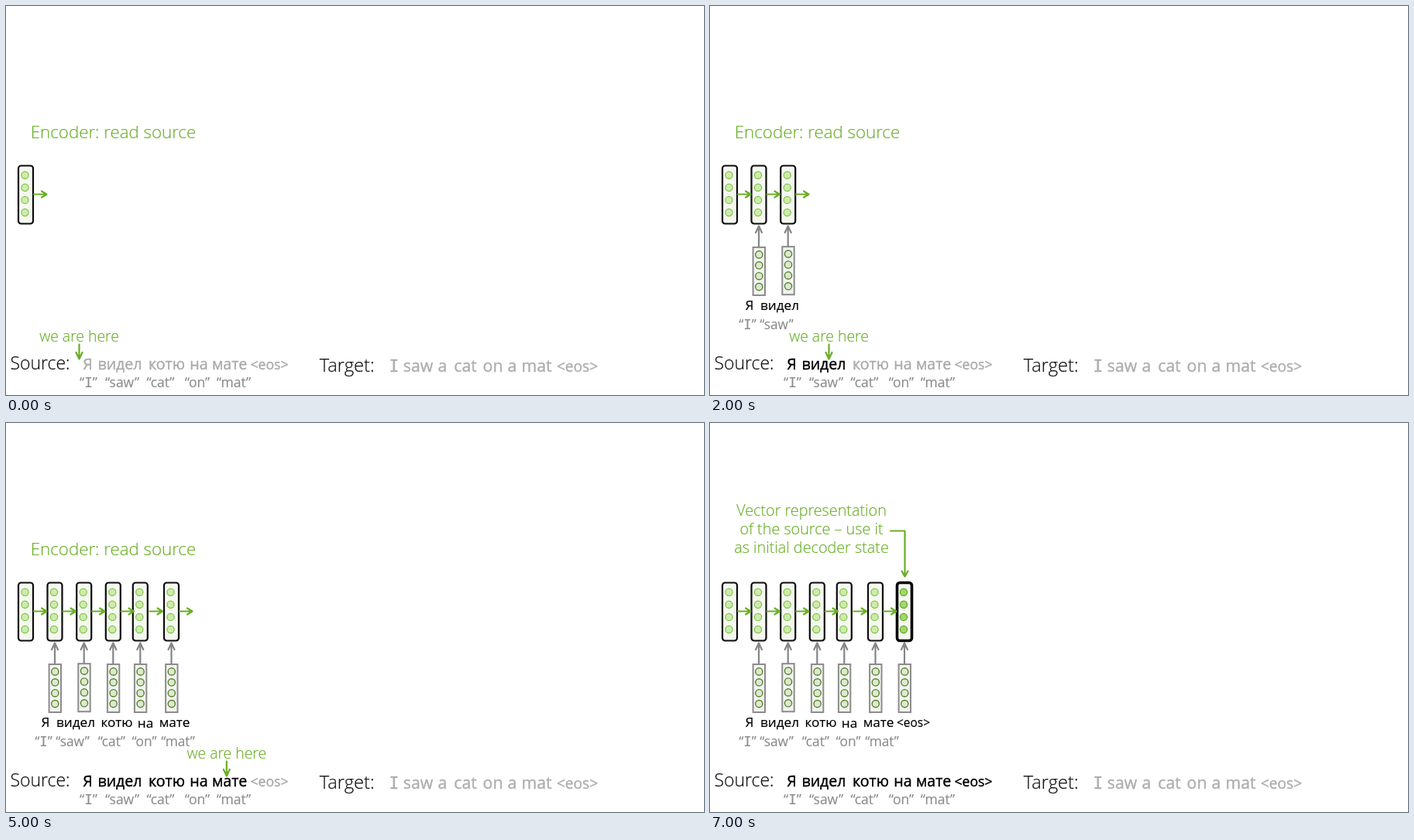
Write an HTML page that moves like this. It is 901 px wide and 503 px high and loops after 8 s.

```html
<!DOCTYPE html>
<html lang="en">
<head>
<meta charset="utf-8">
<title>Encoder reads the sentence</title>
<style>
  html, body { margin: 0; width: 100%; height: 100%; overflow: hidden; background: #fff; }
  svg { display: block; width: 901px; height: 503px; }
  text { font-family: "Open Sans", "Noto Sans", sans-serif; text-anchor: middle; white-space: pre; }
  .light { font-weight: 300; stroke-width: .2; }
  .hand { stroke-width: .4; stroke-linejoin: round; }
  .small { stroke-width: .15; }
  .serif { font-family: "DejaVu Sans Mono", monospace; }
  .green { fill: #6cb02a; stroke: #6cb02a; }
  .label { fill: #111; stroke: #111; }
  .line { fill: none; stroke-width: 2.2; stroke-linecap: round; stroke-linejoin: round; }
  .go { stroke: #6aae26; }
  .up { stroke: #868686; }
  .state rect { fill: #f5f8f0; stroke: #0c0c0c; stroke-width: 2.2; }
  .state circle { fill: #cdecab; stroke: #82c14a; stroke-width: 1.2; }
  .final rect { stroke: #000; stroke-width: 3.6; }
  .final circle { fill: #a2d76a; stroke: #62a626; }
  .embed rect { fill: #f3f4f1; stroke: #8c8c8c; stroke-width: 2; }
  .embed circle { fill: #dde9d1; stroke: #568229; stroke-width: 1.4; }

  .on, .off, .word, #here { animation: 8s step-end infinite; }
  .s1 { animation-name: on1; }
  .s2 { animation-name: on2; }
  .s3 { animation-name: on3; }
  .s4 { animation-name: on4; }
  .s5 { animation-name: on5; }
  .s6 { animation-name: on6; }
  .s7 { animation-name: on7; }
  .off { animation-name: off7; }
  .w1 { animation-name: read1; }
  .w2 { animation-name: read2; }
  .w3 { animation-name: read3; }
  .w4 { animation-name: read4; }
  .w5 { animation-name: read5; }
  .w6 { animation-name: read6; }
  #here { animation-name: walk; }

  @keyframes on1 { 0% { visibility: hidden } 12.5% { visibility: visible } }
  @keyframes on2 { 0% { visibility: hidden } 25% { visibility: visible } }
  @keyframes on3 { 0% { visibility: hidden } 37.5% { visibility: visible } }
  @keyframes on4 { 0% { visibility: hidden } 50% { visibility: visible } }
  @keyframes on5 { 0% { visibility: hidden } 62.5% { visibility: visible } }
  @keyframes on6 { 0% { visibility: hidden } 75% { visibility: visible } }
  @keyframes on7 { 0% { visibility: hidden } 87.5% { visibility: visible } }
  @keyframes off7 { 0% { visibility: visible } 87.5% { visibility: hidden } }
  @keyframes read1 { 0% { fill: #aaa; stroke: #aaa } 12.5% { fill: #000; stroke: #000 } }
  @keyframes read2 { 0% { fill: #aaa; stroke: #aaa } 25% { fill: #000; stroke: #000 } }
  @keyframes read3 { 0% { fill: #aaa; stroke: #aaa } 37.5% { fill: #000; stroke: #000 } }
  @keyframes read4 { 0% { fill: #aaa; stroke: #aaa } 50% { fill: #000; stroke: #000 } }
  @keyframes read5 { 0% { fill: #aaa; stroke: #aaa } 62.5% { fill: #000; stroke: #000 } }
  @keyframes read6 { 0% { fill: #aaa; stroke: #aaa } 75% { fill: #000; stroke: #000 } }
  @keyframes walk {
    0% { transform: translateX(94.5px) }
    12.5% { transform: translateX(112.5px) }
    25% { transform: translateX(153.5px) }
    37.5% { transform: translateX(209.8px) }
    50% { transform: translateX(247.5px) }
    62.5% { transform: translateX(284.8px) }
    75%, 100% { transform: translateX(343.5px) }
  }
</style>
</head>
<body>
<svg id="stage" viewBox="0 0 901 503"></svg>
<script>
const words = ['Я', 'видел', 'котю', 'на', 'мате', '&lt;eos&gt;'];
const glosses = ['I', 'saw', 'cat', 'on', 'mat'];
const target = ['I', 'saw', 'a', 'cat', 'on', 'a', 'mat', '&lt;eos&gt;'];

const wordX = [105.5, 147, 207.5, 249, 288.5, 340];
const glossX = [106.5, 150, 199.5, 247, 294];
const targetX = [501, 532, 563.5, 593, 628.5, 653.5, 685, 737.5];
const inputX = [51, 90, 143, 180, 217.5, 262.5];
const inputGlossX = [48.5, 86, 136.5, 178.5, 222];
const stateX = [25.5, 63, 100.7, 138.3, 173.3, 213.5, 251];
const arrowX = [36, 73.5, 111, 148.5, 185.5, 224];

const text = (s, x, y, size, cls, color) =>
  `<text x="${x}" y="${y}" font-size="${size}" class="${cls}"` +
  (color ? ` fill="${color}" stroke="${color}"` : '') + `>${s}</text>`;

// Handwritten-looking text, with a barred capital I
const hand = (s, x, y, size, color, cls = '') =>
  text(s.replace('I', '<tspan class="serif">I</tspan>'), x, y, size, 'hand ' + cls, color);

const quoted = (s, x, y, size) => hand(`“${s}”`, x, y, size, '#8c8c8c', 'small');
const wordSize = (s, size) => s[0] === '&' ? size * .9 : size;
const line = (d, cls) => `<path class="line ${cls}" d="${d}"/>`;
const on = (step, body) => step ? `<g class="on s${step}">${body}</g>` : body;

const cell = (cls, x, y, w, h, rx, dotX, dotY, gap) =>
  `<g class="${cls}"><rect x="${x - w / 2}" y="${y}" width="${w}" height="${h}" rx="${rx}"/>` +
  [0, 1, 2, 3].map(i => `<circle cx="${dotX}" cy="${dotY + i * gap}" r="4.6"/>`).join('') + '</g>';

const state = (x, cls = '') => cell('state ' + cls, x, 206.5, 19, 75, 3.5, x - 1, 218.7, 16.1);
const right = x => line(`M${x} 243.5h16.5m-6.5 -4l6.5 4l-6.5 4`, 'go');

function input(i) {
  const x = stateX[i], y = i === 2 ? 311.2 : 312;
  let out = cell('embed', x + .3, y, 15.4, 62, 0, x + .3, y + 9.4, 13.9);
  out += line(`M${x} 311V284.5m-4 8.5l4 -8.5l4 8.5`, 'up');
  const s = words[i - 1];
  out += hand(s, inputX[i - 1], i === 4 ? 394 : 393, wordSize(s, 17.2), '#000', 'small');
  if (i < 6) out += quoted(glosses[i - 1], inputGlossX[i - 1], 418, 17.3);
  return out;
}

let svg = text('Encoder: read source', 138.5, 171.3, 22.3, 'light green off');

stateX.forEach((x, i) => svg += on(i, state(x) + (i ? input(i) : '')));
svg += on(7, state(251, 'final'));
arrowX.forEach((x, i) => svg += on(i, right(x)));

svg += on(7,
  text('Vector representation', 131, 120, 19.8, 'light green') +
  text('of the source – use it', 131, 144, 19.8, 'light green') +
  text('as initial decoder state', 131, 168, 19.8, 'light green') +
  line('M233 139.5H251.5V198.5m-4 -7l4 7l4 -7', 'go'));

svg += '<g class="off"><g id="here">' +
  text('we are here', 0, 434, 19.4, 'light green') +
  line('M0 437.5V456.5m-4 -8.5l4 8.5l4 -8.5', 'go') + '</g></g>';

svg += text('Source:', 44, 470, 23, 'light label');
svg += text('Target:', 440.2, 473, 23.7, 'light label');
words.forEach((s, i) => svg += hand(s, wordX[i], 470, wordSize(s, 19.6), '', `word w${i + 1}`));
glosses.forEach((s, i) => svg += quoted(s, glossX[i], 493, 17.5));
target.forEach((s, i) => svg += hand(s, targetX[i], 472.5, wordSize(s, 21.2), '#aeaeae'));

document.getElementById('stage').innerHTML = svg;
</script>
</body>
</html>
```
